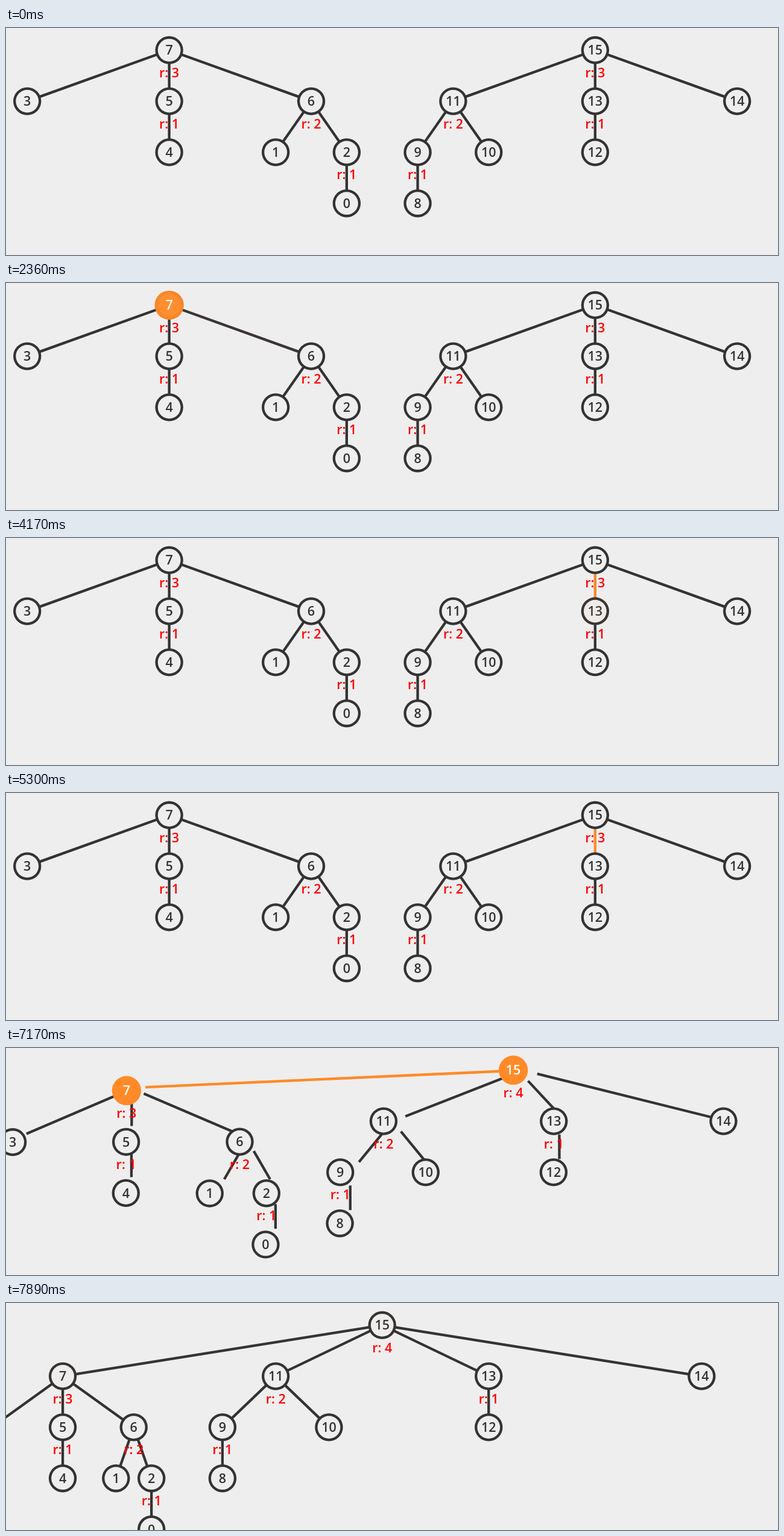
Animation of 1280 by 377 pixels, one loop 9.5 s. Source, as an HTML page with a canvas:

```html
<!DOCTYPE html>
<html lang="en">
<head>
<meta charset="utf-8">
<title>Union of two disjoint sets</title>
<style>
  html, body { margin: 0; width: 100%; height: 100%; overflow: hidden; background: #eee; }
  canvas { display: block; }
</style>
</head>
<body>
<canvas id="stage" width="1280" height="377"></canvas>
<script>
const ctx = document.getElementById('stage').getContext('2d');

const LOOP = 9500, DURATION = 500;
const LINK_START = 6405, MOVE_START = 6936;
const LINE_WIDTH = 4.3, EDGE_GAP = 22;

const DARK = [51, 51, 51], PALE = [238, 238, 238], ORANGE = [255, 138, 39], WHITE = [255, 255, 255];
const LOOKS = {
  plain:   { ring: DARK,   fill: PALE,   text: DARK,   radius: 23.2 },
  outline: { ring: ORANGE, fill: PALE,   text: ORANGE, radius: 23.2 },
  filled:  { ring: ORANGE, fill: ORANGE, text: WHITE,  radius: 24.2 }
};

// Index = label: [column, row, column after, row after, parent, rank]
const nodes = [
  [9, 3, 3.5, 4, 2, 0], [7, 2, 2.5, 3, 6, 0], [9, 2, 3.5, 3, 6, 1], [0, 1, -1, 2, 7, 0],
  [4, 2, 1, 3, 5, 0], [4, 1, 1, 2, 7, 1], [8, 1, 3, 2, 7, 2], [4, 0, 1, 1, 15, 3],
  [11, 3, 5.5, 3, 9, 0], [11, 2, 5.5, 2, 11, 1], [13, 2, 8.5, 2, 11, 0], [12, 1, 7, 1, 15, 2],
  [16, 2, 13, 2, 13, 0], [16, 1, 13, 1, 15, 1], [20, 1, 19, 1, 15, 0], [16, 0, 10, 0, null, 3]
].map(([c0, r0, c1, r1, parent, rank], id) =>
  ({ id, parent, rank, before: place(c0, r0), after: place(c1, r1) }));

const steps = [
  { start: 0 },
  { start: 740, filled: [6] },
  { start: 1245, edge: 6 },
  { start: 1750, filled: [7] },
  { start: 2255, edge: 6 },
  { start: 2760, filled: [7], outline: [6] },
  { start: 3265, filled: [13] },
  { start: 3770, edge: 13 },
  { start: 4275, filled: [15] },
  { start: 4775, edge: 13 },
  { start: 5320, filled: [15], outline: [13] },
  { start: 5860, filled: [7, 15] },
  { start: LINK_START, filled: [7, 15], edge: 7 },
  { start: MOVE_START, filled: [7, 15], edge: 7 },
  { start: 7455 }
];

function place(column, row) {
  return [35.2 + 58.85 * column, 36.8 + 84.8 * row];
}

// Cubic ease in and out over one step
function ease(time, start) {
  const u = Math.min(1, Math.max(0, (time - start) / DURATION));
  return u < 0.5 ? 4 * u ** 3 : 1 - 4 * (1 - u) ** 3;
}

const mix = (a, b, p) => a + (b - a) * p;
const mixList = (a, b, p) => a.map((v, i) => mix(v, b[i], p));
const rgb = color => `rgb(${color.map(Math.round)})`;

function lookOf(step, id) {
  if (step.filled?.includes(id)) return LOOKS.filled;
  return step.outline?.includes(id) ? LOOKS.outline : LOOKS.plain;
}

const edgeColor = (step, id) => step.edge === id ? ORANGE : DARK;

// Both ends of an edge, cut at the rims of its circles
function edgeEnds(from, to) {
  const p = EDGE_GAP / Math.hypot(to[0] - from[0], to[1] - from[1]);
  return [mixList(from, to, p), mixList(to, from, p)];
}

function drawEdge(node, time, previous, current, progress) {
  if (node.parent === null || (node.id === 7 && time < LINK_START)) return;
  const parent = nodes[node.parent];
  const shift = ease(time, MOVE_START + 10 + 0.5 * node.id);
  const old = edgeEnds(parent.before, node.before);
  const next = edgeEnds(parent.after, node.after);
  const top = mixList(old[0], next[0], shift);
  let bottom = mixList(old[1], next[1], shift);
  if (node.id === 7) bottom = mixList(top, bottom, ease(time, LINK_START));

  ctx.strokeStyle = rgb(mixList(edgeColor(previous, node.id), edgeColor(current, node.id), progress));
  ctx.lineWidth = LINE_WIDTH;
  ctx.beginPath();
  ctx.moveTo(...top);
  ctx.lineTo(...bottom);
  ctx.stroke();
}

function disc(x, y, radius, color) {
  ctx.fillStyle = rgb(color);
  ctx.beginPath();
  ctx.arc(x, y, radius, 0, 2 * Math.PI);
  ctx.fill();
}

function drawNode(node, time, previous, current, progress) {
  const [x, y] = mixList(node.before, node.after, ease(time, MOVE_START + 0.4 * node.id));
  const a = lookOf(previous, node.id), b = lookOf(current, node.id);
  const radius = mix(a.radius, b.radius, progress);
  disc(x, y, radius, mixList(a.ring, b.ring, progress));
  disc(x, y, 23.2 - LINE_WIDTH, mixList(a.fill, b.fill, progress));

  ctx.fillStyle = rgb(mixList(a.text, b.text, progress));
  ctx.fillText(node.id, x, y + 7.6);
  if (node.rank) {
    const rank = node.rank + (node.id === 15 && time >= MOVE_START ? 1 : 0);
    ctx.fillStyle = '#f00';
    ctx.fillText('r: ' + rank, x, y + 45);
  }
}

function draw(time) {
  const index = steps.findLastIndex(step => step.start <= time);
  const current = steps[index], previous = steps[Math.max(0, index - 1)];
  const progress = ease(time, current.start);

  ctx.fillStyle = rgb(PALE);
  ctx.fillRect(0, 0, 1280, 377);
  ctx.font = '600 21.5px "Open Sans", "Noto Sans", sans-serif';
  ctx.textAlign = 'center';
  for (const node of nodes) drawEdge(node, time, previous, current, progress);
  for (const node of nodes) drawNode(node, time, previous, current, progress);
}

const origin = performance.now();
function tick() {
  draw((performance.now() - origin) % LOOP);
  requestAnimationFrame(tick);
}
tick();
</script>
</body>
</html>
```
